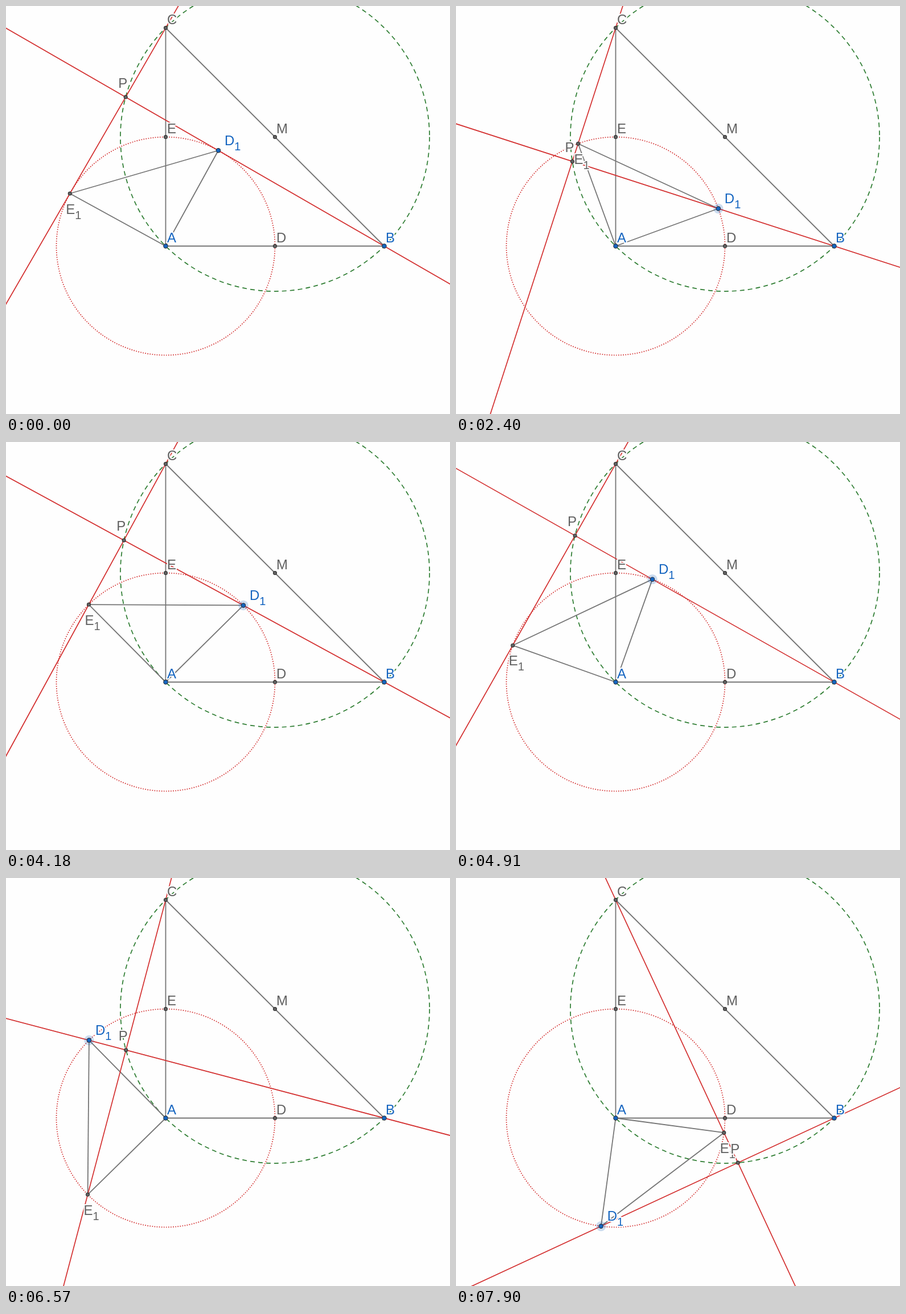
An HTML page with a canvas that plays this animation: 780x718 px, repeating every 8 s.

```html
<!DOCTYPE html>
<html lang="en">
<head>
<meta charset="utf-8">
<title>Rotating right triangle</title>
<style>
  html, body { margin: 0; width: 100%; height: 100%; overflow: hidden; background: #fefefe; }
  canvas { display: block; }
</style>
</head>
<body>
<canvas id="stage" width="780" height="718"></canvas>
<script>
const ctx = document.getElementById('stage').getContext('2d');
const LOOP = 8000;
const GRAY = '#616161', BLUE = '#1565c0', RED = '#d32f2f', GREEN = '#2e7d32', PAPER = '#fefefe';
const RADIUS = 192;

const A = { x: 280.5, y: 422.5 };
const B = { x: 664.5, y: 422.5 };
const C = { x: 280.5, y: 38.5 };
const mid = (p, q) => ({ x: (p.x + q.x) / 2, y: (p.y + q.y) / 2 });
const D = mid(A, B), E = mid(A, C), M = mid(B, C);

// Runs of pointer updates: first time, last time, number of updates
const RUNS = [
  [120, 120, 1], [360, 580, 3], [720, 950, 3], [1100, 1320, 3], [1430, 1900, 5],
  [2030, 2400, 4], [2510, 2750, 3], [2860, 3570, 7], [3700, 3810, 2],
  [3970, 4180, 3], [4300, 4670, 4], [4800, 5490, 7], [5620, 6330, 7],
  [6440, 6570, 2], [6680, 6680, 1], [6840, 7540, 7], [7660, 7900, 3]
];
const UPDATES = [0, ...RUNS.flatMap(([from, to, count]) =>
  Array.from({ length: count }, (_, i) => from + (count > 1 ? i * (to - from) / (count - 1) : 0)))];

// Drag of D1 around A: time, angle in degrees
const DRAG = [
  [0, 61.2], [240, 61.2], [360, 66], [580, 77.3], [950, 86.8], [1320, 94.2], [1430, 94.4],
  [1900, 57], [2400, 20.1], [2900, 3], [3200, 9], [3570, 24.5], [3810, 33], [4180, 44.7],
  [4670, 65], [5490, 96.6], [5620, 99.1], [6570, 134.5], [7130, 185], [7540, 229], [7900, 262.3]
];

function slope(i) {
  if (i < 1 || i > DRAG.length - 2) return 0;
  const [p, q, r] = [DRAG[i - 1], DRAG[i], DRAG[i + 1]];
  const before = (q[1] - p[1]) / (q[0] - p[0]);
  const after = (r[1] - q[1]) / (r[0] - q[0]);
  return before * after <= 0 ? 0 : 2 * before * after / (before + after);
}

function dragAngle(t) {
  let i = 0;
  while (i < DRAG.length - 2 && t >= DRAG[i + 1][0]) i++;
  const [t0, a0] = DRAG[i], [t1, a1] = DRAG[i + 1];
  const span = t1 - t0, u = Math.min(1, (t - t0) / span), v = 1 - u;
  return v * v * (1 + 2 * u) * a0 + u * u * (3 - 2 * u) * a1
    + span * u * v * (v * slope(i) - u * slope(i + 1));
}

function onCircle(degrees) {
  const a = degrees * Math.PI / 180;
  return { x: A.x + RADIUS * Math.cos(a), y: A.y - RADIUS * Math.sin(a) };
}

function foot(point, from, to) {
  const dx = to.x - from.x, dy = to.y - from.y;
  const k = ((point.x - from.x) * dx + (point.y - from.y) * dy) / (dx * dx + dy * dy);
  return { x: from.x + k * dx, y: from.y + k * dy };
}

function segment(p, q, color = GRAY, width = 1.8) {
  ctx.strokeStyle = color;
  ctx.lineWidth = width;
  ctx.beginPath();
  ctx.moveTo(p.x, p.y);
  ctx.lineTo(q.x, q.y);
  ctx.stroke();
}

function line(p, q) {
  const length = Math.hypot(q.x - p.x, q.y - p.y);
  const dx = (q.x - p.x) / length * 1500, dy = (q.y - p.y) / length * 1500;
  segment({ x: p.x - dx, y: p.y - dy }, { x: p.x + dx, y: p.y + dy }, RED, 1.7);
}

function disc(p, r, color) {
  ctx.fillStyle = color;
  ctx.beginPath();
  ctx.arc(p.x, p.y, r, 0, 2 * Math.PI);
  ctx.fill();
}

function ring(center, r, color, dash) {
  ctx.strokeStyle = color;
  ctx.lineWidth = 1.7;
  ctx.setLineDash(dash);
  ctx.beginPath();
  ctx.arc(center.x, center.y, r, 0, 2 * Math.PI);
  ctx.stroke();
  ctx.setLineDash([]);
}

function outlined(text, x, y, size, color) {
  ctx.font = `${size}px "Liberation Sans", Arial, sans-serif`;
  ctx.lineJoin = 'round';
  ctx.lineWidth = 4;
  ctx.strokeStyle = PAPER;
  ctx.strokeText(text, x, y);
  ctx.fillStyle = color;
  ctx.fillText(text, x, y);
  return ctx.measureText(text).width;
}

function point(p, name, { color = GRAY, dx = 2.5, dy = -6.5, sub = '' } = {}) {
  disc(p, color === BLUE ? 4.2 : 3.5, '#222');
  disc(p, color === BLUE ? 3.3 : 2.6, color);
  const x = p.x + dx, y = p.y + dy;
  const width = outlined(name, x, y, 24, color);
  if (sub) outlined(sub, x + width, y + 9, 20, color);
}

function draw(now) {
  const t = now % LOOP;
  const updated = UPDATES.findLast(u => u <= t + 0.5);
  const angle = dragAngle(updated);
  const D1 = onCircle(angle), E1 = onCircle(angle + 90);
  const P = foot(C, B, D1);

  ctx.fillStyle = PAPER;
  ctx.fillRect(0, 0, 780, 718);

  ring(A, RADIUS, RED, [1.7, 2.4]);
  ring(M, Math.hypot(B.x - M.x, B.y - M.y), GREEN, [8, 6]);
  for (const [p, q] of [[A, B], [B, C], [C, A], [A, D1], [D1, E1], [E1, A]]) segment(p, q, '#757575');
  line(B, D1);
  line(C, E1);

  point(A, 'A', { color: BLUE });
  point(B, 'B', { color: BLUE });
  point(C, 'C');
  point(D, 'D');
  point(E, 'E');
  point(M, 'M');
  if (updated > 0) disc(D1, 8.7, 'rgba(21, 101, 192, 0.22)');
  point(D1, 'D', { color: BLUE, dx: 11, dy: -9.5, sub: '1' });
  point(E1, 'E', { dx: -7, dy: 35.5, sub: '1' });
  point(P, 'P', { dx: -13, dy: -16.5 });
}

const start = performance.now();
function tick() {
  draw(performance.now() - start);
  requestAnimationFrame(tick);
}
tick();
</script>
</body>
</html>
```
